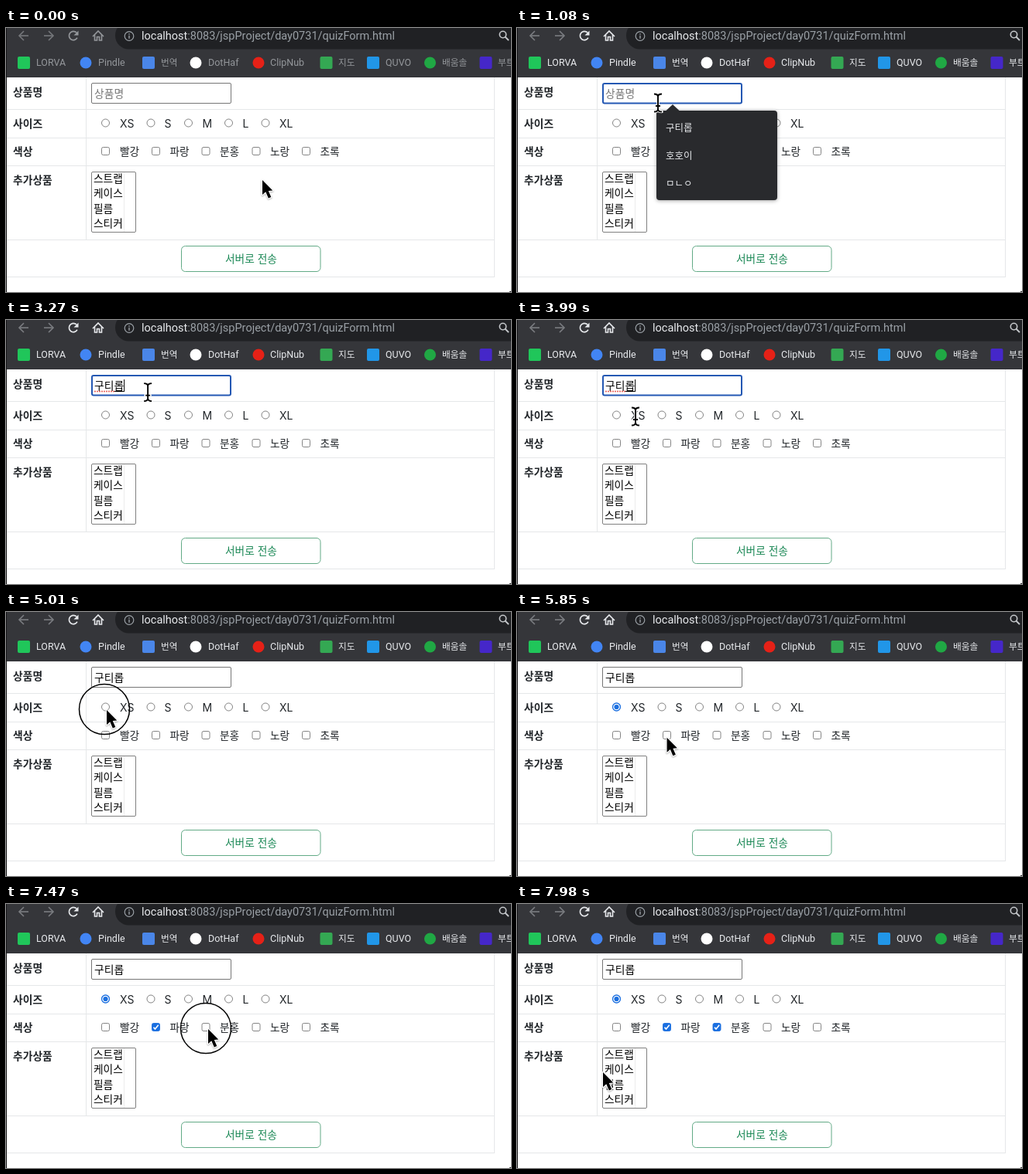
Recreate the animation shown at these times as an HTML page with a canvas. Size 652 by 342 pixels, loop 8000 ms.

```html
<!DOCTYPE html>
<html lang="ko">
<head>
<meta charset="utf-8">
<style>
html, body { margin: 0; width: 100%; height: 100%; overflow: hidden; background: #fff; }
canvas { display: block; width: 652px; height: 342px; }
</style>
</head>
<body>
<canvas id="stage" width="652" height="342"></canvas>
<script>
const ctx = document.getElementById('stage').getContext('2d');
const LOOP = 8000;
const UI = 'Roboto, "Noto Sans CJK KR", "Noto Sans CJK JP", sans-serif';
const FORM = 'Inter, "Noto Sans CJK KR", "Noto Sans CJK JP", sans-serif';
const PRODUCT = '구티롭';
const FOCUS = 270, BLUR = 4920;
const SYLLABLE = 12.7;

// time, x, y
const path = [
  [30, 330, 196], [300, 182, 97], [3210, 182, 97], [3450, 189, 76],
  [3750, 160, 131], [3960, 153, 125], [4230, 153, 125], [4320, 160, 125],
  [4470, 160, 125], [4860, 129, 126], [5280, 129, 126], [5880, 193, 162],
  [6360, 193, 162], [6600, 284, 162], [6720, 279, 162], [6870, 266, 161],
  [7050, 266, 161], [7110, 260, 161], [7560, 260, 161], [7960, 110, 217]
];
const clicks = [FOCUS, BLUR, 6090, 7320];
const RING_TIME = 250, RELEASE = 180;

const typing = [
  [1770, 'ㄱ'], [2220, '구'], [2440, '굳'], [2500, '구티'],
  [2550, '구틸'], [2700, '구티로'], [2850, PRODUCT]
];

const bookmarks = [
  [23, 39, 'LORVA', '#20c65a'], [103, 119, 'Pindle', '#4285f4', true],
  [184, 200, '번역', '#4a86e8'], [245, 261, 'DotHaf', '#ffffff', true],
  [326, 341, 'ClipNub', '#e62117', true], [413.5, 429, '지도', '#34a853'],
  [474, 490, 'QUVO', '#2196e8'], [547.5, 563, '배움솔', '#20a844', true],
  [619.5, 635, '부트', '#4527c9']
];
const sizes = [[128.5, 147, 'XS'], [187, 204.5, 'S'], [235.5, 253.5, 'M'], [287.5, 305.5, 'L'], [335, 353, 'XL']];
const colors = [[128.5, 147, '빨강'], [193.5, 211.5, '파랑'], [258, 276, '분홍'], [323, 341, '노랑'], [387.5, 405.5, '초록']];

const clamp = v => Math.max(0, Math.min(1, v));
const ramp = (t, a, b) => clamp((t - a) / (b - a));
const between = (t, a, b) => t >= a && t < b;

function text(str, x, y, size, color, font = FORM, weight = 400) {
  ctx.font = `${weight} ${size}px ${font}`;
  ctx.fillStyle = color;
  ctx.fillText(str, x, y);
}
function rect(x, y, w, h, color) {
  ctx.fillStyle = color;
  ctx.fillRect(x, y, w, h);
}
function box(x, y, w, h, r, fill, stroke, width = 1) {
  ctx.beginPath();
  ctx.roundRect(x, y, w, h, r);
  if (fill) { ctx.fillStyle = fill; ctx.fill(); }
  if (stroke) { ctx.strokeStyle = stroke; ctx.lineWidth = width; ctx.stroke(); }
}
function circle(x, y, r, fill, stroke, width = 1) {
  ctx.beginPath();
  ctx.arc(x, y, r, 0, Math.PI * 2);
  if (fill) { ctx.fillStyle = fill; ctx.fill(); }
  if (stroke) { ctx.strokeStyle = stroke; ctx.lineWidth = width; ctx.stroke(); }
}
function line(points, color, width) {
  ctx.beginPath();
  points.forEach(([x, y]) => ctx.lineTo(x, y));
  ctx.strokeStyle = color;
  ctx.lineWidth = width;
  ctx.stroke();
}

function drawToolbar(active) {
  const bright = active ? '#e8eaed' : '#94979b';
  const faint = active ? '#7b7d81' : '#75777b';
  rect(0, 0, 652, 64, '#35363a');
  box(141, -8, 530, 35.5, 17.5, '#202124');

  line([[29, 10], [17, 10]], faint, 1.6);
  line([[23, 4], [17, 10], [23, 16]], faint, 1.6);
  line([[49, 10], [61, 10]], faint, 1.6);
  line([[55, 4], [61, 10], [55, 16]], faint, 1.6);

  ctx.beginPath();
  ctx.arc(87, 10, 5.6, 0.5, Math.PI * 1.75);
  ctx.strokeStyle = bright;
  ctx.lineWidth = 1.7;
  ctx.stroke();
  ctx.beginPath();
  ctx.moveTo(93.5, 3.5); ctx.lineTo(93.5, 9.5); ctx.lineTo(87.5, 9.5);
  ctx.fillStyle = bright;
  ctx.fill();
  line([[112, 11], [119, 4], [126, 11]], bright, 1.6);
  line([[114.5, 9], [114.5, 16], [117.5, 16], [117.5, 11.5], [120.5, 11.5], [120.5, 16], [123.5, 16], [123.5, 9]], bright, 1.6);

  circle(159, 10.5, 5.8, null, '#9aa0a6', 1.2);
  rect(158.3, 9.7, 1.4, 4, '#9aa0a6');
  rect(158.3, 7.2, 1.4, 1.4, '#9aa0a6');
  const host = 'localhost';
  text(host, 175, 15, 14.5, '#e8eaed', UI);
  const hostWidth = ctx.measureText(host).width;
  text(':8083/jspProject/day0731/quizForm.html', 175 + hostWidth, 15, 14.5, '#9aa0a6', UI);
  circle(641.5, 8.5, 4.2, null, '#c4c7ca', 1.6);
  line([[644.5, 11.5], [649, 16]], '#c4c7ca', 1.8);

  for (const [x, labelX, label, color, round] of bookmarks) {
    if (round) circle(x, 45, 7.5, color);
    else box(x - 8, 37, 16, 16, 2, color);
    const size = /[가-힣]/.test(label) ? 11.7 : 12.5;
    text(label, labelX, 49.3, size, bright, UI);
  }
}

function drawRadio(x, checked) {
  circle(x, 123, 5, '#fff', checked ? '#1a6fe0' : '#767676', checked ? 1.3 : 0.9);
  if (checked) circle(x, 123, 3.1, '#1a6fe0');
}
function drawCheck(x, checked) {
  box(x - 5, 154.5, 10, 10, 2, checked ? '#1a6fe0' : '#fff', checked ? '#1a6fe0' : '#767676', 0.9);
  if (checked) line([[x - 3, 159.7], [x - 1, 162], [x + 3.2, 156.8]], '#fff', 1.6);
}

function drawForm(t) {
  const grid = '#e5e7e9';
  rect(0, 64, 652, 278, '#fff');
  for (const y of [105, 142, 178, 274, 322]) rect(1, y, 630, 1, grid);
  rect(103, 64, 1, 211, grid);
  rect(630, 64, 1, 259, grid);
  [['상품명', 87.5], ['사이즈', 128.5], ['색상', 164.5], ['추가상품', 201.5]]
    .forEach(([label, y]) => text(label, 9, y, 13.8, '#212529', FORM, 700));

  sizes.forEach(([x, labelX, label], i) => {
    drawRadio(x, i === 0 && t >= BLUR + RELEASE);
    text(label, labelX, 129, 14, '#212529');
  });
  const checkTimes = [Infinity, clicks[2] + RELEASE, clicks[3] + RELEASE];
  colors.forEach(([x, labelX, label], i) => {
    drawCheck(x, t >= checkTimes[i]);
    text(label, labelX, 165, 13.7, '#212529');
  });

  box(110.5, 186.5, 57, 78, 1.5, '#fff', '#808080');
  rect(152, 187, 1, 77, '#ececec');
  ['스트랩', '케이스', '필름', '스티커'].forEach((label, i) =>
    text(label, 113, 200 + i * 19.3, 13.7, '#000'));

  box(226.5, 282.5, 179.5, 33, 5, '#fff', '#62aa86');
  text('서버로 전송', 283, 304, 13.7, '#198754');
}

function drawInput(t) {
  const focused = between(t, FOCUS, BLUR);
  if (focused) box(111, 72, 179, 25.5, 2, '#fff', '#2458b3', 2);
  else box(110.5, 71.5, 180, 26, 1.5, '#fff', '#767676');

  const value = typing.reduce((s, [at, str]) => t >= at ? str : s, '');
  if (value) text(value, 114, 90, 13.8, '#000');
  else text('상품명', 114, 90, 13.8, '#757575');
  if (!focused) return;

  const end = 114 + value.length * SYLLABLE;
  if (value) rect(end - SYLLABLE, 92, SYLLABLE, 1, '#000');
  if (t >= 3210) {
    for (let x = 115; x < end - SYLLABLE; x += 3) circle(x, 92.5, 0.9, '#e5443b');
  }
  const off = between(t, 1080, 1530) || between(t, 3360, 3850) || t >= 4320;
  if (!off) rect(end, 77, 1, 16, '#000');
}

function drawSuggestions(items, alpha) {
  if (alpha <= 0) return;
  const h = 8 + items.length * 36;
  ctx.save();
  ctx.globalAlpha = alpha;
  ctx.shadowColor = 'rgba(0,0,0,.35)';
  ctx.shadowBlur = 5;
  ctx.shadowOffsetY = 1;
  box(180, 107, 156, h, 4, '#292a2d');
  ctx.shadowColor = 'transparent';
  ctx.beginPath();
  ctx.moveTo(192, 107.5); ctx.lineTo(201, 99); ctx.lineTo(210, 107.5);
  ctx.fill();
  items.forEach((item, i) => text(item, 192, 134 + i * 36, 12.5, '#e8eaed'));
  ctx.restore();
}

function pointerAt(t) {
  const next = path.findIndex(p => p[0] > t);
  if (next === 0) return path[0].slice(1);
  if (next < 0) return path[path.length - 1].slice(1);
  const [t0, x0, y0] = path[next - 1], [t1, x1, y1] = path[next];
  const u = ramp(t, t0, t1), e = u * u * (3 - 2 * u);
  return [x0 + (x1 - x0) * e, y0 + (y1 - y0) * e];
}
function overText(x, y) {
  const hit = (list, w) => list.some(([, lx]) => x >= lx - 1 && x <= lx + w);
  return (x > 110 && x < 291 && y > 71 && y < 99)
    || (y > 115 && y < 133 && hit(sizes, 19))
    || (y > 152 && y < 169 && hit(colors, 26));
}
function outline(draw, width) {
  ctx.lineJoin = 'round';
  ctx.lineCap = 'round';
  draw('#fff', width);
  ctx.lineJoin = 'miter';
  ctx.lineCap = 'butt';
}
function drawArrow(x, y) {
  ctx.save();
  ctx.translate(x, y);
  ctx.shadowColor = 'rgba(0,0,0,.3)';
  ctx.shadowBlur = 2;
  ctx.shadowOffsetY = 1;
  ctx.beginPath();
  [[1, 1], [1, 20], [5.3, 16.2], [8.8, 24.5], [12.3, 23], [8.8, 15], [14.3, 14.6]]
    .forEach(([px, py]) => ctx.lineTo(px, py));
  ctx.closePath();
  outline(color => { ctx.strokeStyle = color; ctx.lineWidth = 2.4; ctx.stroke(); });
  ctx.shadowColor = 'transparent';
  ctx.fillStyle = '#000';
  ctx.fill();
  ctx.restore();
}
function drawBeam(x, y) {
  const stroke = (color, width) => {
    ctx.beginPath();
    ctx.moveTo(x - 5, y - 11.5);
    ctx.quadraticCurveTo(x, y - 11.5, x, y - 8);
    ctx.lineTo(x, y + 8);
    ctx.quadraticCurveTo(x, y + 11.5, x - 5, y + 11.5);
    ctx.moveTo(x + 5, y - 11.5);
    ctx.quadraticCurveTo(x, y - 11.5, x, y - 8);
    ctx.moveTo(x, y + 8);
    ctx.quadraticCurveTo(x, y + 11.5, x + 5, y + 11.5);
    ctx.moveTo(x - 3, y + 4);
    ctx.lineTo(x + 3, y + 4);
    ctx.strokeStyle = color;
    ctx.lineWidth = width;
    ctx.stroke();
  };
  outline(stroke, 3.6);
  stroke('#000', 1.9);
}
function drawPointer(t) {
  if (between(t, typing[0][0], 3210)) return;
  const [x, y] = pointerAt(t);
  (overText(x, y) ? drawBeam : drawArrow)(x, y);
  const click = clicks.find(at => between(t, at, at + RING_TIME));
  if (click === undefined) return;
  ctx.globalAlpha = 1 - ramp(t, click + 150, click + RING_TIME);
  circle(x - 2, y, 32.5, null, '#000', 1.5);
  ctx.globalAlpha = 1;
}

function render(t) {
  drawForm(t);
  drawInput(t);
  drawToolbar(t >= FOCUS);
  rect(0, 0, 1, 342, '#151517');
  rect(650, 341, 2, 1, '#333');
  drawSuggestions([PRODUCT, '호호이', 'ㅁㄴㅇ'], ramp(t, 590, 750) - ramp(t, 1760, 1830));
  drawSuggestions([PRODUCT], ramp(t, 2210, 2320) - ramp(t, 2440, 2550));
  drawPointer(t);
}

const start = performance.now();
function tick() {
  render((performance.now() - start) % LOOP);
  requestAnimationFrame(tick);
}
tick();
</script>
</body>
</html>
```
